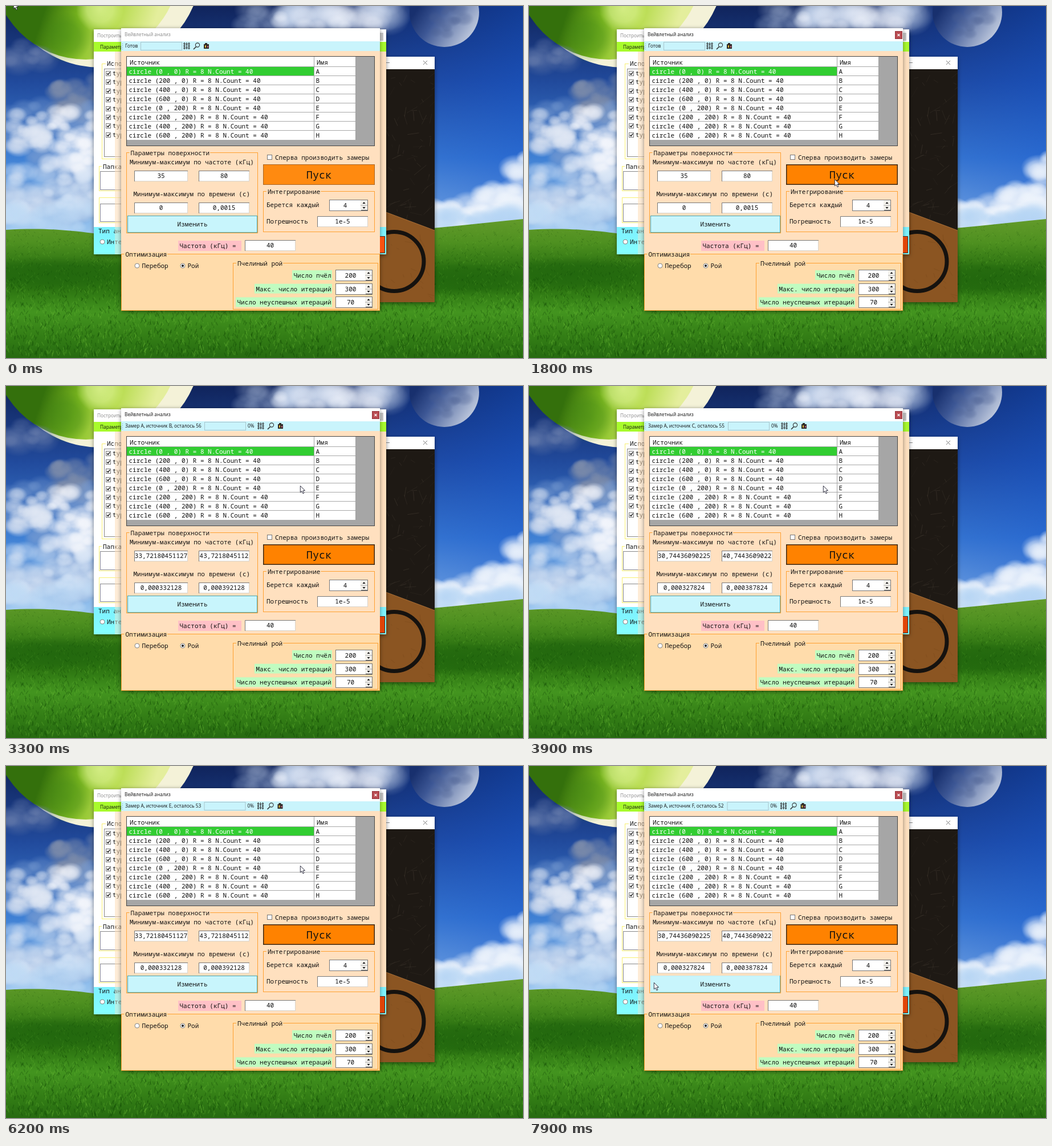
Write an HTML page with a canvas that moves like this. It is 907x618 px and loops after 8 s.

```html
<!DOCTYPE html>
<html lang="ru">
<head>
<meta charset="utf-8">
<style>
html, body { margin: 0; width: 100%; height: 100%; overflow: hidden; }
canvas { display: block; }
</style>
</head>
<body>
<canvas id="stage" width="907" height="618"></canvas>
<script>
const W = 907, H = 618, LOOP = 8000;
const stage = document.getElementById('stage').getContext('2d');
const still = document.createElement('canvas');
still.width = W; still.height = H;
let g = still.getContext('2d');

const MONO = '"Noto Sans Mono", "DejaVu Sans Mono", monospace';
const SANS = '"Open Sans", "Noto Sans", sans-serif';
const ORANGE = '#ffa030', PEACH = '#ffe0bf', SAND = '#ffdcab';

let seed = 7;
const rnd = () => (seed = seed * 16807 % 2147483647) / 2147483647;

function fill(x, y, w, h, color) { g.fillStyle = color; g.fillRect(x, y, w, h); }
function frame(x, y, w, h, color, lw = 1) {
  g.strokeStyle = color; g.lineWidth = lw;
  g.strokeRect(x + lw / 2, y + lw / 2, w - lw, h - lw);
}
function line(color, lw, ...p) {
  g.strokeStyle = color; g.lineWidth = lw; g.beginPath();
  for (let i = 0; i < p.length; i += 2) g.lineTo(p[i], p[i + 1]);
  g.stroke();
}
function poly(color, ...p) {
  g.fillStyle = color; g.beginPath();
  for (let i = 0; i < p.length; i += 2) g.lineTo(p[i], p[i + 1]);
  g.closePath(); g.fill();
}
function dot(x, y, r, color) {
  g.fillStyle = color; g.beginPath(); g.arc(x, y, r, 0, 7); g.fill();
}
function ring(x, y, r, color, lw) {
  g.strokeStyle = color; g.lineWidth = lw; g.beginPath(); g.arc(x, y, r, 0, 7); g.stroke();
}
// y is the middle of the capitals
function text(s, x, y, { size = 11, font = MONO, color = '#101010', align = 'left' } = {}) {
  g.font = `${size}px ${font}`; g.fillStyle = color; g.textAlign = align;
  g.fillText(s, x, y + size * 0.36);
}
function small(s, x, y, color) { text(s, x, y, { size: 8.3, font: SANS, color }); }
function gradient(x0, y0, x1, y1, ...colors) {
  const grad = g.createLinearGradient(x0, y0, x1, y1);
  colors.forEach((c, i) => grad.addColorStop(i / (colors.length - 1), c));
  return grad;
}
function glow(x, y, r, rgb, a, flat = 1) {
  g.save(); g.translate(x, y); g.scale(1, flat);
  const grad = g.createRadialGradient(0, 0, 0, 0, 0, r);
  grad.addColorStop(0, `rgba(${rgb},${a})`);
  grad.addColorStop(0.55, `rgba(${rgb},${a * 0.75})`);
  grad.addColorStop(1, `rgba(${rgb},0)`);
  dot(0, 0, r, grad);
  g.restore();
}
function puffs(x, y, w, h, n, r, rgb, a) {
  while (n--) glow(x + w * rnd(), y + h * rnd(), r * (0.5 + rnd()), rgb, a, 0.75);
}
function shadowed(draw) {
  g.save(); g.shadowColor = 'rgba(0,0,0,.45)'; g.shadowBlur = 7; g.shadowOffsetY = 2;
  draw(); g.restore();
}

function wallpaper() {
  fill(0, 0, W, 400, gradient(0, 0, 0, 400, '#10245c', '#214a9c', '#3f80d4', '#9cc8f0'));
  fill(560, 0, 347, 400, gradient(560, 0, W, 0, 'rgba(20,70,190,0)', 'rgba(20,84,205,.5)'));
  // green planet with a pale rim
  dot(165, -70, 178, '#f4f2d8');
  dot(140, -70, 164, gradient(70, 0, 250, 60, '#34700c', '#7cb820', '#b8dc50', '#e4ee9c'));
  glow(165, 5, 42, '225,245,150', 0.8);
  glow(105, 55, 45, '60,130,20', 0.5);
  // clouds
  puffs(420, -5, 270, 42, 30, 34, '205,220,242', 0.3);
  puffs(480, 12, 180, 25, 14, 25, '245,248,255', 0.4);
  puffs(0, 60, 70, 40, 12, 22, '110,130,175', 0.35);
  puffs(85, 130, 80, 70, 24, 20, '125,140,170', 0.6);
  puffs(0, 175, 160, 200, 70, 26, '120,155,208', 0.45);
  puffs(5, 190, 70, 65, 22, 18, '225,232,244', 0.6);
  puffs(75, 180, 90, 110, 36, 20, '245,247,252', 0.65);
  puffs(0, 285, 155, 85, 44, 22, '220,232,247', 0.5);
  puffs(0, 355, 160, 40, 20, 25, '190,218,245', 0.5);
  for (let i = 0; i < 90; i++) {
    const u = rnd(), top = 355 - 105 * u * u;
    glow(745 + 175 * u, top + (395 - top) * rnd(), 14 + 20 * rnd(), '238,244,252', 0.6, 0.75);
  }
  puffs(750, 365, 160, 24, 18, 26, '180,212,244', 0.5);
  // moon
  g.save(); g.beginPath(); g.arc(769, 11, 61, 0, 7); g.clip();
  fill(700, 0, 140, 80, gradient(725, 0, 815, 60, '#18306e', '#3d5795', '#8193bb', '#c3cde0'));
  puffs(745, 0, 65, 50, 12, 14, '75,95,145', 0.35);
  g.restore();
  // meadow
  g.save(); g.beginPath(); g.moveTo(0, 393);
  g.bezierCurveTo(80, 388, 130, 396, 200, 405);
  g.bezierCurveTo(450, 425, 700, 395, W, 374);
  g.lineTo(W, H); g.lineTo(0, H); g.closePath(); g.clip();
  fill(0, 370, W, 248, gradient(0, 375, 0, H, '#629a2a', '#4e9020', '#2e7412', '#2c7411', '#43941f', '#347f16', '#266a10'));
  for (let i = 0; i < 5200; i++) {
    const d = Math.pow(rnd(), 0.8), x = rnd() * W, y = 378 + 240 * d;
    line(rnd() < 0.55 ? 'rgba(14,68,4,.3)' : 'rgba(110,185,55,.28)', 0.7 + d, x, y, x + (rnd() - 0.5) * 8, y - 2 - 5 * d);
  }
  glow(80, 470, 170, '18,85,8', 0.4, 0.18);
  glow(800, 480, 160, '18,85,8', 0.4, 0.18);
  g.restore();
}

function darkWindow() {
  shadowed(() => fill(640, 89, 112, 431, '#fff'));
  fill(640, 111, 112, 409, '#1e1914');
  g.save(); g.beginPath(); g.rect(640, 111, 112, 409); g.clip();
  for (let i = 0; i < 75; i++) {
    const x = 640 + 112 * rnd(), y = 111 + 270 * rnd();
    line(`rgba(150,135,115,${0.08 + 0.22 * rnd()})`, 0.6, x, y, x + 30 * rnd() - 8, y + 24 * rnd() - 18);
  }
  poly('#8b5522', 640, 352, 752, 394, 752, 520, 640, 520);
  line('#a86e36', 1, 640, 352, 752, 394);
  for (let i = 0; i < 16; i++) {
    const x = 656 + 96 * rnd(), y = 400 + 115 * rnd();
    line('rgba(90,50,16,.3)', 0.6, x, y, x + 15 * rnd(), y + 14 * rnd());
  }
  ring(681, 448.5, 52, '#15120f', 7);
  g.restore();
  line('#888', 1, 666, 99.5, 673, 99.5);
  line('#777', 1, 732, 96, 739, 103);
  line('#777', 1, 739, 96, 732, 103);
}

function field(x, y, w, h, s) {
  fill(x, y, w, h, '#fff');
  frame(x, y, w, h, '#d8d4cc');
  line('#777', 1, x + 0.5, y + h, x + 0.5, y + 0.5, x + w, y + 0.5);
  g.save(); g.beginPath(); g.rect(x + 1, y, w - 2, h); g.clip();
  text(s, x + w / 2, y + h / 2, { align: 'center' });
  g.restore();
}
function spinner(x, y, w, s) {
  field(x, y, w, 20, '');
  frame(x, y, w, 20, '#777');
  text(s, x + (w - 12) / 2, y + 10, { align: 'center' });
  const c = x + w - 7;
  fill(c - 6, y + 1, 12, 18, '#f3f1ec');
  line('#aaa', 1, c - 6, y + 10, c + 6, y + 10);
  line('#555', 1, c - 5, y + 18.5, c + 6, y + 18.5);
  poly('#111', c - 2.5, y + 7, c + 2.5, y + 7, c, y + 4);
  poly('#111', c - 2.5, y + 13, c + 2.5, y + 13, c, y + 16);
}
function group(x, y, w, h, title, tx, bg, color = ORANGE) {
  frame(x, y, w, h, color);
  fill(tx - 2, y - 3, title.length * 6.6 + 3, 8, bg);
  text(title, tx, y + 1);
}
function radio(x, y, on, label, lx) {
  dot(x, y, 4, '#fff'); ring(x, y, 4, '#777', 0.9);
  if (on) dot(x, y, 2, '#111');
  text(label, lx, y);
}
function check(x, y, on) {
  fill(x, y, 9, 9, '#fff'); frame(x, y, 9, 9, '#777');
  if (on) line('#111', 1.4, x + 2, y + 4.5, x + 4, y + 6.5, x + 7.2, y + 2.2);
}

function backWindow() {
  shadowed(() => fill(154, 41, 513, 395, '#fff'));
  small('Построить', 160, 52, '#888');
  fill(655, 47, 7, 14, '#c8c8c8');
  fill(154, 63, 513, 17, '#a8fb2c');
  small('Параметры', 165, 72);
  fill(154, 388, 513, 48, gradient(0, 388, 0, 436, '#7cf0ff', '#86ffff'));
  frame(168, 101, 80, 168, '#f8f070');
  fill(175, 97, 30, 9, '#fff');
  text('Использовать', 177, 101);
  frame(172, 110, 60, 155, '#888');
  for (let i = 0; i < 8; i++) {
    const y = 118 + 15.4 * i;
    check(175, Math.round(y - 4), true);
    text('type', 187, y);
  }
  group(163, 281, 80, 44, 'Папка', 170, '#fff', '#f8f070');
  frame(165, 290, 60, 33, '#888');
  frame(163, 336, 80, 45, '#f8f070');
  frame(165, 347, 60, 32, '#888');
  text('Тип анализа', 162, 395);
  radio(169, 414, false, 'Интервал', 177);
  fill(191, 80, 11, 308, 'rgba(255,222,185,.55)');
  fill(191, 388, 11, 48, 'rgba(220,235,215,.55)');
  fill(656, 80, 11, 308, PEACH);
}

function mainWindow() {
  shadowed(() => fill(202, 39, 454, 496, PEACH));
  fill(202, 39, 454, 23, '#fff');
  fill(202, 62, 454, 17, '#c9f4fc');
  for (let y = 66; y < 77; y += 3) fill(204, y, 1, 1, '#7899a0');
  // table
  fill(211, 88, 436, 158, '#a6a6a6');
  frame(211, 88, 436, 158, '#444');
  fill(212, 89, 401, 146, '#fff');
  fill(212, 107, 328, 15, '#32cd32');
  for (let i = 0; i < 9; i++) fill(212, Math.round(106 + 16.07 * i), 401, 1, '#a8a8a8');
  fill(540, 89, 1, 146, '#a0a0a0');
  fill(613, 89, 1, 146, '#a0a0a0');
  text('Источник', 217, 99);
  text('Имя', 545, 99);
  for (let i = 0; i < 8; i++) {
    const y = 115 + 16.07 * i;
    text(`circle (${i % 4 * 200} , ${i < 4 ? 0 : 200}) R = 8 N.Count = 40`, 215.5, y, { color: i ? '#101010' : '#fff' });
    text('ABCDEFGH'[i], 543.5, y);
  }
  group(211, 257, 231, 142, 'Параметры поверхности', 218.5, PEACH);
  text('Минимум-максимум по частоте (кГц)', 217, 274);
  text('Минимум-максимум по времени (с)', 223.5, 330);
  fill(302, 412, 111, 18, '#ffc0c6');
  text('Частота (кГц) =', 304.5, 421);
  field(419, 411, 89, 19, '40');
  check(458, 261, false);
  text('Сперва производить замеры', 472, 266);
  group(451, 325, 196, 72, 'Интегрирование', 459, PEACH);
  text('Берется каждый', 457, 349);
  spinner(567, 340, 68, '4');
  text('Погрешность', 457, 378);
  field(546, 369, 89, 19, '1e-5');
  // optimisation
  fill(202, 435, 454, 100, SAND);
  group(202, 435, 454, 100, 'Оптимизация', 209.5, SAND);
  radio(230, 456, false, 'Перебор', 238.5);
  radio(310, 456, true, 'Рой', 318.5);
  group(398, 451, 255, 82, 'Пчелиный рой', 406, SAND);
  [['Число пчёл', '200'], ['Макс. число итераций', '300'], ['Число неуспешных итераций', '70']].forEach(([s, v], i) => {
    const y = 473 + 23.7 * i, w = s.length * 6.6 + 4;
    fill(572 - w, y - 9, w, 17, '#c0fcc0');
    text(s, 570.5, y, { align: 'right' });
    spinner(578, Math.round(y - 10), 65, v);
  });
}

// [time, x, y] of the pointer tip
const path = [
  [0, 13, -7], [200, 13, -7], [1000, 546, 301], [1300, 538, 314], [1500, 536, 304], [2500, 536, 304],
  [2600, 533, 300], [2700, 533, 300], [2900, 230, 85], [3000, 170, 66], [3200, 636, 51], [3300, 516, 175],
  [6300, 516, 175], [6600, 395, 200], [7000, 395, 200], [7200, 418, 343], [7300, 418, 343],
  [7600, 330, 413], [7900, 219, 380], [8000, 219, 380]
];
function pointerAt(t) {
  t = Math.floor(t / 100) * 100;
  const i = path.findIndex(p => p[0] > t);
  const a = path[i - 1], b = path[i], u = (t - a[0]) / (b[0] - a[0]), e = u * u * (3 - 2 * u);
  return [a[1] + (b[1] - a[1]) * e, a[2] + (b[2] - a[2]) * e];
}

const low = ['33,72180451127', '43,7218045112', '0,000332128', '0,000392128'];
const edge = ['30,74436090225', '40,7443609022', '0,000327824', '0,000387824'];
const values = [
  [0, ['35', '80', '0', '0,0015']], [2300, low], [3700, edge],
  [4900, ['38,18796992481', '48,1879699248', '8,072E-05', '0,00014072']], [5900, low], [7400, edge]
];
// source letter, amount left, left side of the progress box
const states = [
  [0, null], [2100, ['B', 56, 348]], [3900, ['C', 55, 349]], [5100, ['D', 54, 349]],
  [6200, ['E', 53, 347.5]], [7600, ['F', 52, 347.5]]
];
const latest = (list, t) => list.filter(e => e[0] <= t).pop()[1];

function statusBar(state) {
  const x = state ? state[2] : 236, icons = x + (state ? 93 : 75);
  small(state ? `Замер A, источник ${state[0]}, осталось ${state[1]}` : 'Готов', 209, 70);
  fill(x, 63, 73, 15, '#c9f4fc');
  frame(x, 63, 73, 15, '#a9c5cc');
  if (state) small('0%', x + 76, 70);
  for (let i = 0; i < 3; i++) {
    const c = icons + 2 + 4 * i;
    line('#222', 1, c, 64, c, 76);
    for (const y of i === 1 ? [67, 73] : [66, 70, 74]) {
      dot(c, y, 1.6, '#222'); dot(c, y, 0.7, '#c9f4fc');
    }
  }
  ring(icons + 25, 68.5, 3.6, '#333', 1.1);
  line('#333', 1.6, icons + 22.5, 71.5, icons + 18, 76);
  fill(icons + 36, 67, 9, 8, '#302b28');
  fill(icons + 38, 65, 4, 2, '#302b28');
  fill(icons + 38, 69, 2, 4, '#e0b83c');
  fill(icons + 42, 70, 2, 3, '#b85c78');
}

function pointer(x, y) {
  const p = [0, 0, 0, 11.6, 2.7, 9.2, 4.7, 13.6, 6.6, 12.7, 4.7, 8.5, 8.2, 8.2].map((v, i) => v + (i % 2 ? y : x) + 0.3);
  poly('#fff', ...p);
  line('#1c1c30', 0.9, ...p, p[0], p[1]);
}

function render(now) {
  const t = now % LOOP, active = t >= 1800, [px, py] = pointerAt(t);
  g.drawImage(still, 0, 0);
  small('Вейвлетный анализ', 208, 50.5, active ? '#111' : '#888');
  if (active) {
    fill(642, 44, 13, 14, '#b84a50');
    frame(642, 44, 13, 14, '#983840');
    line('#fff', 1.1, 646.5, 49, 650.5, 53);
    line('#fff', 1.1, 650.5, 49, 646.5, 53);
  }
  statusBar(latest(states, t));
  latest(values, t).forEach((s, i) => field(i % 2 ? 338 : 225, i < 2 ? 289 : 345, i % 2 ? 89 : 94, 19, s));

  const over = px > 213 && px < 441 && py > 368 && py < 398;
  fill(213, 368, 228, 30, '#c8f5fc');
  frame(213, 368, 228, 30, over ? '#c0eef4' : '#48a4b0');
  if (over) line('#48a4b0', 1, 213, 397.5, 440.5, 397.5, 440.5, 368);
  text('Изменить', 327, 383, { align: 'center' });

  const pressed = t >= 1400;
  fill(451, 278, 196, 36, pressed ? '#ff8200' : '#ff8a10');
  frame(451, 278, 196, 36, pressed ? '#3a2610' : '#a86424', pressed ? 1.5 : 1);
  text('Пуск', 549, 296, { size: 18.5, align: 'center' });

  fill(656, 404, 9, 30, active ? '#e04408' : '#fa5210');
  line('#40302a', 1, 656, 404.5, 664.5, 404.5, 664.5, 433.5, 656, 433.5);
  pointer(px, py);
  requestAnimationFrame(tick);
}

wallpaper();
darkWindow();
backWindow();
mainWindow();
g = stage;
const start = performance.now();
function tick() { render(performance.now() - start); }
tick();
</script>
</body>
</html>
```
